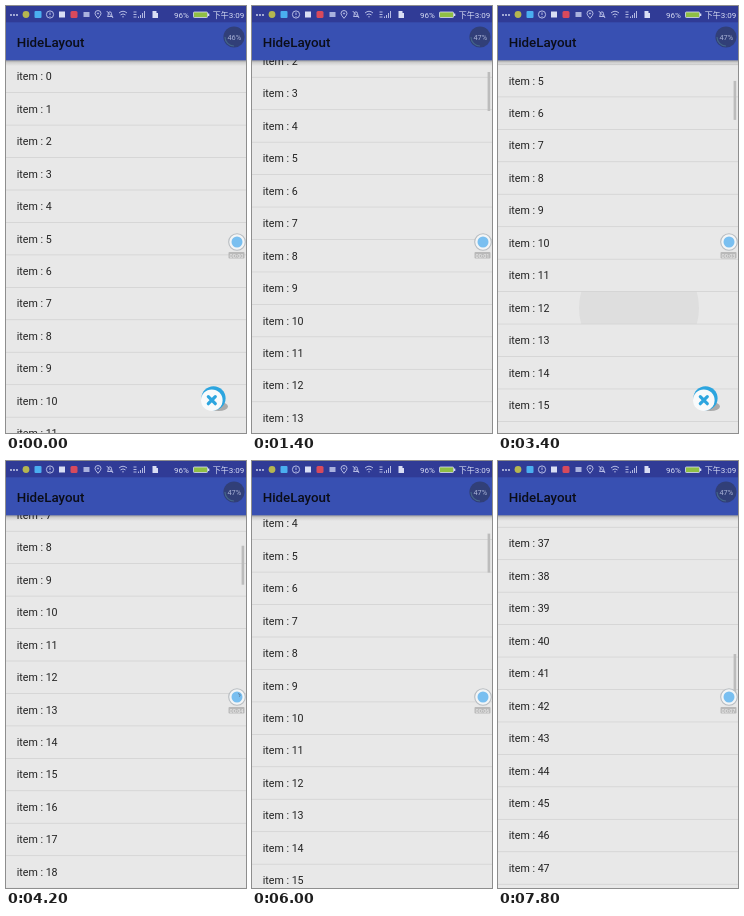
Write an HTML page that moves like this. It is 240 by 427 pixels and loops after 8000 ms.

```html
<!DOCTYPE html>
<html lang="en">
<head>
<meta charset="utf-8">
<title>HideLayout</title>
<style>
  html, body { margin: 0; width: 100%; height: 100%; overflow: hidden; background: #e8e8e8; }
  svg { display: block; width: 100vw; height: 100vh; }
  text { font-family: Roboto, "Noto Sans CJK SC", "Noto Sans CJK", sans-serif; }
  .row text { font-size: 10.67px; fill: #222; }
  .line { fill: none; stroke: #c3c9ed; stroke-width: .9; }
  .status { font-size: 8px; fill: #d9def4; }
</style>
</head>
<body>
<svg viewBox="0 0 240 427" preserveAspectRatio="none">
  <defs>
    <linearGradient id="shade" x2="0" y2="1">
      <stop offset="0" stop-color="#000" stop-opacity=".34"/>
      <stop offset=".45" stop-color="#000" stop-opacity=".1"/>
      <stop offset="1" stop-color="#000" stop-opacity="0"/>
    </linearGradient>
    <clipPath id="rowClip"><rect id="rowBox" width="240" height="32.4"/></clipPath>
  </defs>
  <rect width="240" height="427" fill="#e8e8e8"/>
  <g clip-path="url(#rowClip)"><circle id="ripple" cx="141" fill="#dedede"/></g>
  <g id="list"></g>
  <rect id="thumb" x="235.6" width="2.6" height="39" fill="#bcbcbc"/>

  <g id="fab">
    <ellipse cx="212.5" cy="400.5" rx="9.5" ry="4.5" fill="#777" opacity=".55"/>
    <circle cx="207.5" cy="392.3" r="12.1" fill="#2ca5df"/>
    <circle cx="205.8" cy="394.2" r="10.8" fill="#f8fafb"/>
    <path d="M202.3 390.7l7 7m0-7l-7 7" stroke="#2ca5df" stroke-width="3.2" stroke-linecap="round"/>
  </g>

  <rect y="54" width="240" height="6" fill="url(#shade)"/>
  <rect y="16" width="240" height="38.3" fill="#3850b2"/>
  <rect width="240" height="16.3" fill="#303b96"/>
  <text x="10.7" y="40.8" font-size="13.33" font-weight="500" fill="#0b0d18">HideLayout</text>

  <g fill="#d9def4">
    <circle cx="5" cy="9" r=".9"/><circle cx="8" cy="9" r=".9"/><circle cx="11" cy="9" r=".9"/>
    <circle cx="20" cy="8.5" r="3.4" fill="#b5b650"/>
    <rect x="28.5" y="5" width="7" height="7" rx="1" fill="#4aaef0"/>
    <rect x="53" y="5.5" width="6" height="6"/>
    <rect x="64.5" y="5" width="7" height="7" rx="1.5" fill="#d84a5c"/>
    <rect x="77.5" y="6" width="6" height="5" fill="#a9b1de"/>
    <rect x="146.5" y="5" width="4" height="7"/><rect x="149" y="7" width="3" height="5"/>
  </g>
  <g class="line">
    <circle cx="44" cy="8.5" r="3.6"/><path d="M44 6.5v2.5m0 1v.8"/>
    <path d="M92 12.3q-3-3.2-3-4.8a3 3 0 0 1 6 0q0 1.600-3 4.800z"/><circle cx="92" cy="7.500" r=".6"/>
    <path d="M101.500 10.500h5q-1-1-1-3a1.600 1.600 0 0 0-3.200 0q0 2-.8 3m-.8-5.500l6.500 7"/>
    <path d="M113 7q4-3.500 8 0m-6.500 1.900q2.500-2 5 0m-3.300 1.900h1.600"/>
    <path d="M127.500 6h3m-3 2.500h3m-3 2.500h3m2 1v-1.500m2 1.500v-3m2 3v-5m2 5v-7"/>
  </g>
  <text class="status" x="168" y="11.500" textLength="">96%</text>
  <rect x="187.500" y="6" width="14" height="5.500" rx=".8" fill="#8fbf45" stroke="#d9def4" stroke-width=".8"/>
  <rect x="202" y="7.500" width="1.300" height="2.500" fill="#d9def4"/>
  <text class="status" x="206.800" y="11.600" font-size="7.600">下午3:09</text>

  <circle cx="228" cy="31" r="10.600" fill="#303c70" opacity=".88"/>
  <path d="M219 31a9 9 0 0 0 9 9" fill="none" stroke="#4b7590" stroke-width="1.200" opacity=".7"/>
  <text id="load" x="228.300" y="33.700" font-size="7.400" text-anchor="middle" fill="#a9b2d6"></text>

  <circle cx="231" cy="236" r="8.300" fill="#f3f5f6" stroke="#b7bcc0" stroke-width="1.100"/>
  <circle cx="231" cy="236" r="5.500" fill="#79bff0"/>
  <path id="tick" d="M232 232.500l2.300 1.300-1 2" fill="none" stroke="#5b7590" stroke-width=".8"/>
  <rect x="222.500" y="246" width="16" height="6.600" rx="1" fill="#b9b9b9"/>
  <text id="clock" x="230.500" y="251.500" font-size="5.600" text-anchor="middle" fill="#f2f2f2"></text>
</svg>
<script>
const LOOP = 8000, STEP = 200, PITCH = 32.45, TOP = 54.3, ROWS = 13;
const $ = id => document.getElementById(id);

// [time, scroll offset]
const scrollKeys = [
  [0, 0], [400, 0], [1400, 80.3], [2200, 130.3], [2700, 188], [3200, 158], [3400, 158],
  [4200, 243.6], [4600, 262], [5400, 96], [5600, 96], [6000, 137.8],
  [6600, 480], [7200, 940], [7800, 1188.6], [8000, 1225]
];
// [start, end, from, to] of the button's slide
const fabMoves = [[500, 800, 0, 1], [2800, 3100, 1, 0], [3600, 3900, 0, 1], [4800, 5100, 1, 0], [5700, 6000, 0, 1]];

const clamp = x => Math.max(0, Math.min(1, x));
const ease = x => x * x * (3 - 2 * x);

// Monotone cubic: stays flat at turning points
function scrollAt(t) {
  const k = scrollKeys, last = k.length - 1;
  const slope = i => (k[i + 1][1] - k[i][1]) / (k[i + 1][0] - k[i][0]);
  const tangent = i => {
    if (i <= 0 || i >= last) return slope(i <= 0 ? 0 : last - 1);
    const a = slope(i - 1), b = slope(i);
    return a * b > 0 ? 2 * a * b / (a + b) : 0;
  };
  let i = 0;
  while (i < last - 1 && t >= k[i + 1][0]) i++;
  const h = k[i + 1][0] - k[i][0], u = (t - k[i][0]) / h, e = ease(u);
  return k[i][1] * (1 - e) + k[i + 1][1] * e
    + h * u * (1 - u) * ((1 - u) * tangent(i) - u * tangent(i + 1));
}

function fabAt(t) {
  let hidden = 0;
  for (const [a, b, from, to] of fabMoves)
    if (t >= a) hidden = from + (to - from) * ease(clamp((t - a) / (b - a)));
  return hidden;
}

$("list").innerHTML = Array.from({ length: ROWS }, () =>
  `<g class="row"><text x="10.7" y="20"></text><rect y="32" width="240" height=".7" fill="#cfcfcf"/></g>`).join("");
const rows = [...$("list").children];

function draw(t) {
  const s = scrollAt(t), first = Math.floor(s / PITCH);
  const rowY = n => TOP + n * PITCH - s;
  rows.forEach((row, i) => {
    row.setAttribute("transform", `translate(0 ${rowY(first + i)})`);
    row.firstChild.textContent = `item : ${first + i}`;
  });

  $("thumb").setAttribute("y", 56.8 + s * 0.1146);
  $("thumb").setAttribute("opacity", t < 600 ? 0 : 1);
  $("fab").setAttribute("transform", `translate(0 ${fabAt(t) * 50})`);

  const y = rowY(12);
  $("rowBox").setAttribute("y", y);
  $("ripple").setAttribute("cy", y + PITCH / 2);
  $("ripple").setAttribute("r", t < 3200 ? 0 : 20 + (t - 3200) * 0.2);
  $("ripple").setAttribute("opacity", t < 3200 ? 0 : clamp((3800 - t) / 300));

  $("load").textContent = t < 1000 ? "46%" : "47%";
  $("clock").textContent = `00:0${Math.floor(t / 1000)}`;
  $("tick").setAttribute("opacity", t % 2000 === 200 ? 1 : 0);
}

const start = performance.now();
function tick(now) {
  const t = Math.max(0, now - start) % LOOP;
  draw(Math.floor(t / STEP) * STEP);
  requestAnimationFrame(tick);
}
draw(0);
requestAnimationFrame(tick);
</script>
</body>
</html>
```
